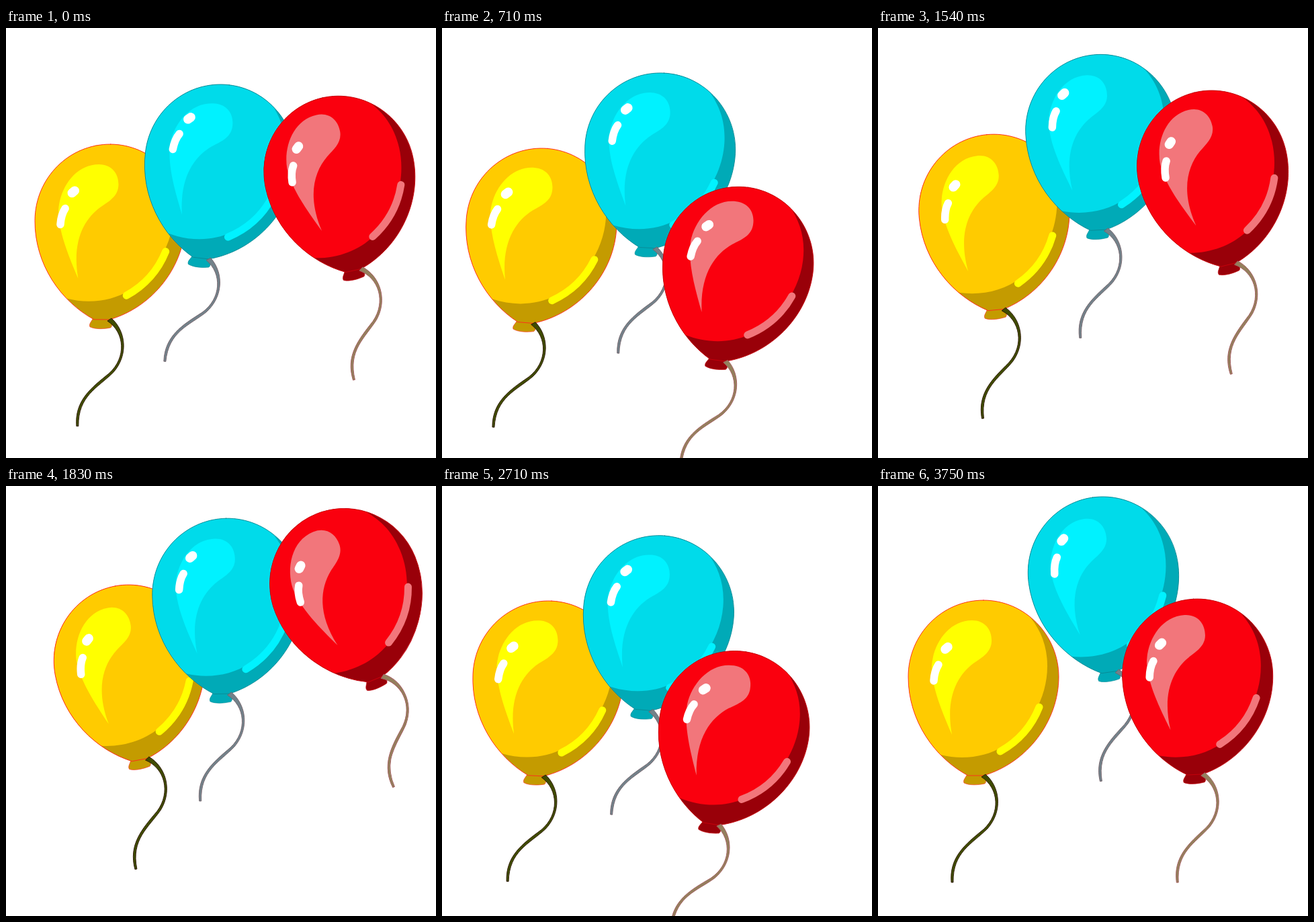
An HTML page that plays this animation: 640x640 px, repeating every 3.79 s.

```html
<!DOCTYPE html>
<html lang="en">
<head>
<meta charset="utf-8">
<title>Three balloons</title>
<style>
  html, body { margin: 0; width: 100%; height: 100%; overflow: hidden; background: #fff; }
  svg { display: block; width: 100vw; height: 100vh; }
</style>
</head>
<body>
<svg id="stage" viewBox="0 0 640 640" xmlns="http://www.w3.org/2000/svg">
  <defs>
    <clipPath id="bodyClip"><path id="clipShape"/></clipPath>
  </defs>
</svg>
<script>
const LOOP = 3790, STEPS = 91;
const SVG = "http://www.w3.org/2000/svg";
const stage = document.getElementById("stage");

// All balloons share one drawing, centred on HUB and tilted by TILT degrees.
const HUB = [157, 282], TILT = 8.5;
const SHAPE = {
  body: "M157,170 C219,170 269,222 269,284 C269,350 222,412 157,431 L134,431 C85,405 45,350 45,284 C45,221 95,170 157,170 Z",
  light: "M80,395 L93,400 C125,408 160,404 187,387 C224,363 252,317 252,268 C252,235 240,210 222,190 L157,100 L-20,170 L0,400 Z",
  knot: "M133,428 C131,434 126,437 128,442 C136,446 150,445 159,443 C163,439 159,433 157,428 Z",
  gloss: "M110,370 C95,335 80,300 80,268 C82,235 105,200 140,200 C160,200 170,215 169,232 C168,248 155,255 142,264 C118,282 100,315 110,370 Z",
  strip: "M240,329 Q223,372 182,395",
  dot: "M100,243 L104,239.500",
  dash: "M90,266 Q84,275 83,290",
  string: "M160,429 C182,448 186,484 163,510 C140,533 111,545 112,590 L109,590 C106,552 130,533 157,511 C183,487 180,450 154,433 Z"
};
document.getElementById("clipShape").setAttribute("d", SHAPE.body);

function add(parent, tag, attrs) {
  const el = document.createElementNS(SVG, tag);
  for (const k in attrs) el.setAttribute(k, attrs[k]);
  return parent.appendChild(el);
}

function makeBalloon(c) {
  const g = add(stage, "g", {});
  const fill = (d, color, more) => add(g, "path", { d, fill: color, ...more });
  const line = (parent, d, color, width) => add(parent, "path", {
    d, fill: "none", stroke: color, "stroke-width": width, "stroke-linecap": "round"
  });
  fill(SHAPE.knot, c.dark, { stroke: c.edge, "stroke-width": 0.6 });
  fill(SHAPE.body, c.dark);
  fill(SHAPE.light, c.main, { "clip-path": "url(#bodyClip)" });
  line(g, SHAPE.body, c.edge, 0.9);
  const shine = add(g, "g", { transform: `translate(${c.shine})` });
  add(shine, "path", { d: SHAPE.gloss, fill: c.gloss });
  line(shine, SHAPE.strip, c.gloss, 11);
  const spots = add(shine, "g", { transform: `translate(${c.spots})` });
  line(spots, SHAPE.dot, "#fff", 13.5);
  line(spots, SHAPE.dash, "#fff", 11.5);
  fill(SHAPE.string, c.string, { stroke: c.stringEdge, "stroke-width": 0.9 });
  return g;
}

const yellow = makeBalloon({
  main: "#ffcb00", dark: "#c49b00", gloss: "#ffff00", edge: "#ff2a20",
  string: "#3f4c00", stringEdge: "#301808", shine: [0, 0], spots: [0, 0]
});
const blue = makeBalloon({
  main: "#00dbea", dark: "#00aab7", gloss: "#00f2ff", edge: "#0a8a96",
  string: "#72828a", stringEdge: "#76646c", shine: [0, 0], spots: [2, -15]
});
const red = makeBalloon({
  main: "#fa000e", dark: "#990009", gloss: "#f2767b", edge: "#c8000c",
  string: "#93805c", stringEdge: "#a65f62", shine: [2.5, -7], spots: [0, 0]
});

// Monotone cubic curve through [step, value] points: each point may be a peak.
function curve(pts) {
  const n = pts.length - 1;
  const slope = i => (pts[i + 1][1] - pts[i][1]) / (pts[i + 1][0] - pts[i][0]);
  const tangent = pts.map((p, i) => {
    if (i === 0) return slope(0);
    if (i === n) return slope(n - 1);
    const a = slope(i - 1), b = slope(i);
    return a * b > 0 ? 2 * a * b / (a + b) : 0;
  });
  return s => {
    let i = 0;
    while (i < n - 1 && s > pts[i + 1][0]) i++;
    const [x0, y0] = pts[i], [x1, y1] = pts[i + 1];
    const h = x1 - x0, u = (s - x0) / h, v = 1 - u;
    return y0 * v * v * (1 + 2 * u) + y1 * u * u * (3 - 2 * u)
      + h * u * v * (tangent[i] * v - tangent[i + 1] * u);
  };
}

const redAngle = curve([[0, -4.2], [3, -7], [13, 8], [17, 15.9], [24, 18.5], [30, 15.5],
  [39, -11.5], [41.5, -16.9], [44, -13.6], [52, -1.4], [65, 17.4], [70, 20.5],
  [75, 15.5], [78, 7], [84, 0], [90, 5.4]]);
const blueAngle = curve([[0, 15.3], [6, 17], [13, 13], [17, 11.5], [26, 7.3], [30, 1.8],
  [33, 0.1], [40, 9], [44, 7.4], [53, -1.7], [65, 13], [70, 15.5], [75, 10.5],
  [78, 6.5], [86, -0.4], [90, 0.5]]);

// Yellow drifts as well as swinging: step, x, y, angle.
const drift = [
  [0, 155, 285, 8.9], [3, 157, 283, 8], [13, 155, 286, 10], [17, 148, 291, 13.2],
  [25, 148, 294, 13.8], [30, 150, 295, 13], [39, 179, 263, 0], [42, 185, 257, -3],
  [44, 183, 259, -2], [52, 161, 286, 7.5], [65, 158, 283, 11.1], [70, 153, 286, 13],
  [75, 159, 283, 10.2], [84, 161, 280, 7.5], [90, 157, 282, 8.5]
];
const [yellowX, yellowY, yellowAngle] = [1, 2, 3].map(k => curve(drift.map(p => [p[0], p[k]])));

function place(g, x, y, angle) {
  g.setAttribute("transform",
    `translate(${x} ${y}) rotate(${angle - TILT}) translate(${-HUB[0]} ${-HUB[1]})`);
}

// Swing around a distant pivot, turning by the same angle.
function swing(g, px, py, r, offset, angle) {
  const a = (angle + offset) * Math.PI / 180;
  place(g, px + r * Math.cos(a), py + r * Math.sin(a), angle);
}

function draw(ms) {
  const s = Math.min(STEPS - 1, Math.floor((ms % LOOP + 4) * STEPS / LOOP));
  place(yellow, yellowX(s), yellowY(s), yellowAngle(s));
  swing(blue, 65, 100, 271.5, 5.4, blueAngle(s));
  swing(red, 87, 127, 417.6, 16.1, redAngle(s));
}

let start = null;
function tick(now) {
  if (start === null) start = now;
  draw(Math.max(0, now - start));
  requestAnimationFrame(tick);
}
draw(0);
requestAnimationFrame(tick);
</script>
</body>
</html>
```
